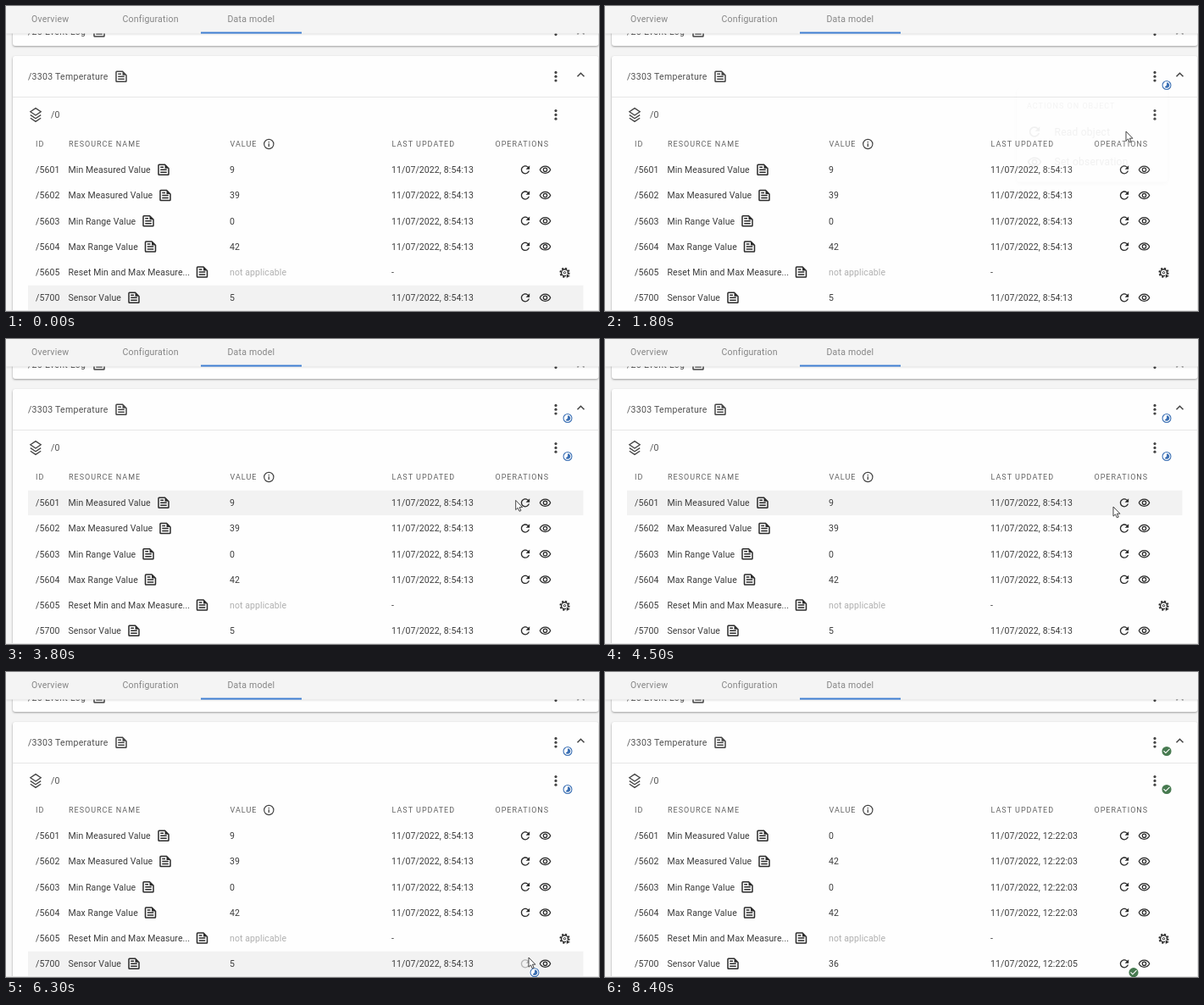
These frames come from a looping animation (700 px wide and 360 px high, 8900 ms). An HTML page:

```html
<!DOCTYPE html>
<html lang="en">
<head>
<meta charset="utf-8">
<title>Data model</title>
<style>
  html, body { margin: 0; width: 100%; height: 100%; overflow: hidden; background: #f4f4f4; }
  svg { display: block; width: 100vw; height: 100vh; }
  text { font: 10.5px Roboto, Arial, sans-serif; letter-spacing: .1px; fill: #3c3c3c; white-space: pre; }
  .tab { letter-spacing: .22px; fill: #858585; }
  .title { letter-spacing: .29px; fill: #505050; }
  .head { font-size: 9px; letter-spacing: 1px; fill: #636363; }
  .faint { fill: #b0b0b0; }
  .item { font-size: 12px; letter-spacing: .25px; }
  .card { fill: #fefefe; filter: drop-shadow(0 1px 1.3px rgba(0, 0, 0, .36)); }
  .panel { fill: #fff; filter: drop-shadow(0 2px 2.5px rgba(0, 0, 0, .38)); }
</style>
</head>
<body>
<svg id="stage" viewBox="0 0 700 360"></svg>
<script>
const LOOP = 8900, STEP = 100;
const INK = '#2b2b2b';

const ICONS = {
  refresh: 'M17.65 6.35C16.2 4.9 14.21 4 12 4c-4.42 0-7.99 3.58-7.99 8s3.57 8 7.99 8c3.73 0 6.84-2.55 7.73-6h-2.08c-.82 2.33-3.04 4-5.65 4-3.31 0-6-2.69-6-6s2.69-6 6-6c1.66 0 3.14.69 4.22 1.78L13 11h7V4z',
  eye: 'M12 6c3.8 0 7.2 2.1 8.8 5.5C19.2 14.9 15.8 17 12 17s-7.2-2.1-8.8-5.5C4.8 8.1 8.2 6 12 6m0-2C7 4 2.7 7.1 1 11.5 2.7 15.9 7 19 12 19s9.3-3.1 11-7.5C21.3 7.1 17 4 12 4zm0 5a2.5 2.5 0 0 1 0 5a2.5 2.5 0 0 1 0-5m0-2a4.5 4.5 0 0 0 0 9a4.5 4.5 0 0 0 0-9z',
  doc: 'M5 3h9.5L21 9.5V19a2 2 0 0 1-2 2H5a2 2 0 0 1-2-2V5a2 2 0 0 1 2-2zM5 5v14h14v-9h-5V5zM7 7h5v2H7zM7 11h10v2H7zM7 15h10v2H7z',
  pending: 'M16.24 7.76C15.07 6.59 13.54 6 12 6v6l-4.24 4.24c2.34 2.34 6.14 2.34 8.49 0 2.34-2.34 2.34-6.14-.01-8.48zM12 2a10 10 0 0 0 0 20a10 10 0 0 0 0-20zm0 18a8 8 0 0 1 0-16a8 8 0 0 1 0 16z',
  done: 'M12 2a10 10 0 0 0 0 20a10 10 0 0 0 0-20zm-2 15l-5-5 1.41-1.41L10 14.17l7.59-7.59L19 8z'
};

const rows = [
  { id: '/5601', name: 'Min Measured Value', doc: 186, from: '9', to: '0' },
  { id: '/5602', name: 'Max Measured Value', doc: 188, from: '39', to: '42' },
  { id: '/5603', name: 'Min Range Value', doc: 168, from: '0', to: '0' },
  { id: '/5604', name: 'Max Range Value', doc: 170.5, from: '42', to: '42' },
  { id: '/5605', name: 'Reset Min and Max Measure...', doc: 231.5 },
  { id: '/5700', name: 'Sensor Value', doc: 151, from: '5', to: '36' }
];
const rowY = i => 193.3 + i * 30.2;

// Cursor tip: time, x, y
const path = [
  [0, 618, 374], [100, 618, 364], [300, 622, 322], [600, 638, 190], [900, 648, 84], [1000, 648, 84],
  [1200, 617, 135], [1400, 615, 147], [1800, 615, 148], [2400, 648, 125], [2800, 648, 126],
  [3000, 648, 139], [3400, 603, 190], [4300, 600, 191], [4500, 600, 198], [5200, 608, 331],
  [5800, 613, 338], [6000, 613, 338], [6300, 617, 337], [6500, 617, 338], [6900, 621, 366], [8900, 621, 374]
];

const T = {
  objectMenu: [1000, 1600], instanceMenu: [2800, 3500],
  objectRead: 1700, instanceRead: 3800, sensorRead: 6000,
  valuesIn: 7400, sensorIn: 8000
};

const text = (s, x, y, cls = '', more = '') => `<text x="${x}" y="${y}" class="${cls}" ${more}>${s}</text>`;
const icon = (name, x, y, size, fill = INK, more = '') =>
  `<path d="${ICONS[name]}" fill="${fill}" fill-rule="evenodd" transform="translate(${x} ${y}) scale(${size / 24}) translate(-12 -${name === 'eye' ? 11.5 : 12})" ${more}/>`;
const dots = (x, y) => [-4.8, 0, 4.8].map(d => `<circle cx="${x}" cy="${y + d}" r="1.6" fill="#444"/>`).join('');
const line = (d, width = 1.4, color = INK) => `<path d="${d}" fill="none" stroke="${color}" stroke-width="${width}"/>`;
const chevron = (x, y) => line(`M${x - 4} ${y + 2.2}l4-4 4 4`, 1.5, '#444');

const gear = y => `<g transform="translate(659.5 ${y})" fill="none" stroke="${INK}">
  <circle r="3.9" stroke-width="1.4"/><circle r="5.2" stroke-width="1.8" stroke-dasharray="2.05 2.03"/>
  <circle r="1.2" stroke-width="1"/><path d="M2 1.2l4.8 2.8-4.8 2.8z" fill="${INK}" stroke="#fefefe" stroke-width=".7"/></g>`;

function rowMarkup(r, i) {
  const y = rowY(i), base = y + 3.8, sensor = i === 5;
  const cells = r.from === undefined
    ? text('not applicable', 264, base, 'faint') + text('-', 455, base) + gear(y + .6)
    : text(r.from, 264, base, '', `id="value${i}"`) + text('', 455, base, '', `id="date${i}"`) +
      icon('refresh', 613, y, 15.5, INK, sensor ? 'id="sensorRefresh"' : '') + icon('eye', 636.5, y, 15);
  return `<rect id="row${i}" x="26" y="${y - 14.6}" width="655.5" height="${sensor ? 29 : 29.4}" fill="#f2f2f2"/>` +
    text(r.id, 35, base) + text(r.name, 73.5, base) + icon('doc', r.doc, y, 18) + cells;
}

const menu = (id, y, title, action) => `<g id="${id}">
  <rect class="panel" x="486" y="${y}" width="178" height="110" rx="3"/>
  <rect id="${id}Hover0" x="486" y="${y + 33}" width="178" height="36" fill="#f2f2f2"/>
  ${text(title, 498, y + 23, 'head')}
  ${icon('refresh', 507, y + 51, 18.5)}${text(action, 530.5, y + 55, 'item')}
  ${icon('eye', 507, y + 86.5, 18)}${text('Set observation', 530.5, y + 90.5, 'item')}</g>`;

const badge = (id, x, y) => `<g id="${id}"><circle cx="${x}" cy="${y}" r="6.3" fill="#fff"/>
  ${icon('pending', x, y, 13.2, '#3c70b4', `id="${id}Pending"`)}${icon('done', x, y, 13.4, '#477a50', `id="${id}Done"`)}</g>`;

document.getElementById('stage').innerHTML = `
  <rect width="700" height="360" fill="#f4f4f4"/>
  <rect class="card" x="8" y="10" width="691.5" height="37" rx="3"/>
  ${text('/25 Event Log', 26, 34.3, 'title')}${icon('doc', 110, 30, 18, '#444')}${dots(649, 28.8)}${chevron(678.5, 31)}
  <rect width="700" height="32.5" fill="#f4f4f4" style="filter:drop-shadow(0 1px 1px rgba(0,0,0,.12))"/>
  ${text('Overview', 30, 18.8, 'tab')}${text('Configuration', 137.5, 18.8, 'tab')}${text('Data model', 261.5, 18.8, 'tab')}
  <rect x="230" y="30.6" width="119" height="2" fill="#3f7fd2"/>
  <rect class="card" x="8" y="59" width="691.5" height="310" rx="3"/>
  ${text('/3303 Temperature', 26, 87.3, 'title')}${icon('doc', 136, 83.3, 18, '#444')}${dots(649, 83.2)}${chevron(678.5, 81)}
  <rect x="8" y="107" width="691.5" height="1" fill="#e6e6e6"/>
  <circle id="ripple" cx="649" cy="128.5" r="10.5" fill="#f1f1f1"/>
  ${line('M28.8 124.8l6.2-4.2 6.2 4.2-6.2 4.2zM28.8 128.6l6.2 4.2 6.2-4.2M28.8 132.2l6.2 4.2 6.2-4.2', 1.3, '#444')}
  ${text('/0', 53, 132.2, 'title')}${dots(649, 128.4)}
  ${text('ID', 35, 166.4, 'head')}${text('RESOURCE NAME', 74, 166.4, 'head')}${text('VALUE', 264.5, 166.4, 'head')}
  ${text('LAST UPDATED', 455.5, 166.4, 'head')}${text('OPERATIONS', 577.5, 166.4, 'head')}
  <circle cx="310.3" cy="163" r="5.6" fill="none" stroke="#444" stroke-width="1.2"/>
  ${line('M310.3 162.3v3.8M310.3 159.9v1.4', 1.3, '#444')}
  ${rows.map(rowMarkup).join('')}
  <rect y="359" width="700" height="1" fill="#e4e4e4"/>
  ${badge('objectBadge', 663, 93.5)}${badge('instanceBadge', 663, 138.5)}${badge('sensorBadge', 624, 354.7)}
  ${menu('objectMenu', 97.5, 'ACTIONS ON OBJECT', 'Read object')}
  ${menu('instanceMenu', 142.5, 'ACTIONS ON INSTANCE', 'Read instance')}
  <g id="cursor" fill="#fff" stroke="#333" stroke-width=".9" stroke-linejoin="round">
    <path id="arrow" d="M0 0v11.2l2.5-2.3 1.8 4 1.9-.8-1.8-3.9h3.5z"/>
    <path id="hand" d="M-1.2 8.5V1.2a1.2 1.2 0 0 1 2.4 0v4.3q1.2-1 2.2.2 1.2-.7 2 .4 1.5-.3 1.6 1.2v3.2q0 2-1.2 3.2v1.6H-.5v-1.3l-3.8-4.5q-.6-1.5.9-1.4z"/>
  </g>`;

const el = id => document.getElementById(id);
const show = (id, on) => el(id).setAttribute('opacity', +on);
const within = (v, a, b) => v >= a && v < b;

function cursorAt(t) {
  const k = Math.max(1, path.findIndex(p => p[0] > t));
  const [t0, x0, y0] = path[k - 1], [t1, x1, y1] = path[k];
  const u = (t - t0) / (t1 - t0);
  return [x0 + (x1 - x0) * u, y0 + (y1 - y0) * u];
}

function menuOpacity(t, [open, close]) {
  if (t < open) return 0;
  if (t < close) return Math.min(1, .6 + (t - open) / 200);
  return [.75, .35, .06][(t - close) / STEP] || 0;
}

function setBadge(id, t, start, end) {
  show(id, t >= start);
  show(id + 'Pending', t < end);
  show(id + 'Done', t >= end);
}

function draw(t) {
  const [x, y] = cursorAt(t);
  const menus = ['objectMenu', 'instanceMenu'];
  const inMenu = menus.some(m => within(t, ...T[m]));
  let overItem = false;

  menus.forEach((m, i) => {
    show(m, menuOpacity(t, T[m]));
    const top = [130, 175][i];
    const over = within(t, ...T[m]) && within(y, top, top + 36);
    show(m + 'Hover0', over);
    overItem = overItem || over;
  });

  rows.forEach((r, i) => {
    const mid = rowY(i);
    const over = y >= mid - 15 && (i === 5 || y < mid + 15);
    show('row' + i, over && !inMenu && t < T.valuesIn);
    if (r.from === undefined) return;
    const fresh = t >= (i === 5 ? T.sensorIn : T.valuesIn);
    el('value' + i).textContent = fresh ? r.to : r.from;
    el('date' + i).textContent = '11/07/2022, ' + (fresh ? (i === 5 ? '12:22:05' : '12:22:03') : '8:54:13');
  });

  setBadge('objectBadge', t, T.objectRead, T.valuesIn);
  setBadge('instanceBadge', t, T.instanceRead, T.valuesIn);
  setBadge('sensorBadge', t, T.sensorRead, T.sensorIn);
  el('sensorRefresh').setAttribute('fill', within(t, T.sensorRead, T.sensorIn) ? '#b5b5b5' : INK);
  show('ripple', within(t, 2400, 3500));

  const onDots = Math.abs(x - 649) < 6 && (Math.abs(y - 83) < 9 || Math.abs(y - 128) < 9);
  const onRefresh = within(t, 5600, T.sensorRead);
  const hand = overItem || onDots || onRefresh;
  show('hand', hand);
  show('arrow', !hand);
  el('cursor').setAttribute('transform', `translate(${x.toFixed(1)} ${y.toFixed(1)})`);
}

const started = performance.now();
function tick() {
  const t = (performance.now() - started) % LOOP;
  draw(Math.floor(t / STEP) * STEP);
  requestAnimationFrame(tick);
}
tick();
</script>
</body>
</html>
```
